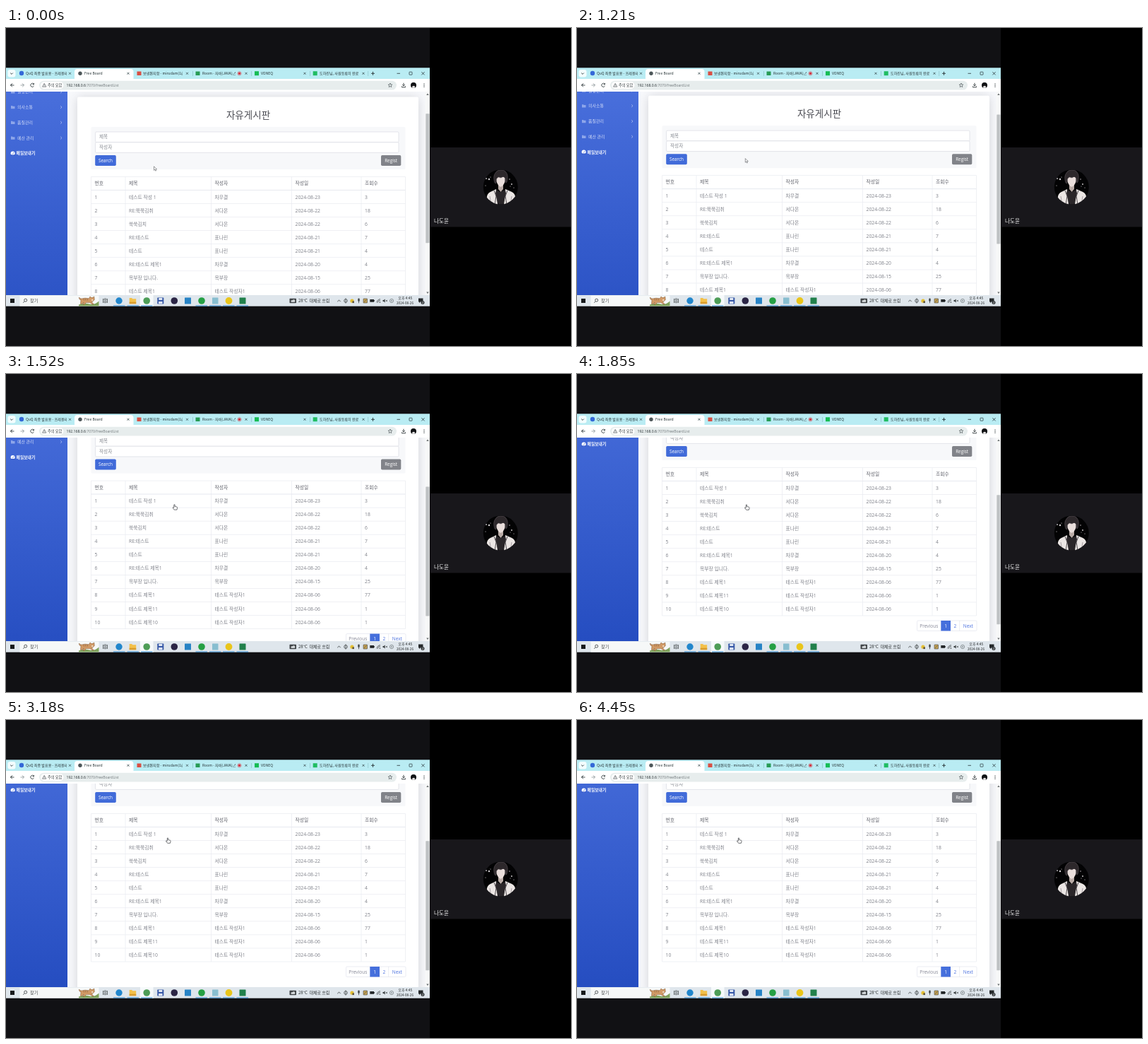
An HTML page with a canvas that plays this animation: 800 by 450 pixels, repeating every 4510 ms.

```html
<!DOCTYPE html>
<html lang="ko">
<head>
<meta charset="utf-8">
<title>자유게시판</title>
<style>
html, body { margin: 0; width: 100%; height: 100%; overflow: hidden; background: #000; }
canvas { display: block; width: 800px; height: 450px; }
</style>
</head>
<body>
<canvas id="stage" width="800" height="450"></canvas>
<script>
const ctx = document.getElementById('stage').getContext('2d');
const LOOP = 4510;
const SANS = '"Open Sans", "Noto Sans CJK KR", "Noto Sans CJK", sans-serif';
const UI = '"Noto Sans CJK KR", "Noto Sans CJK", "Noto Sans", sans-serif';

// [time, value...] keys, eased between neighbours
const SCROLL = [[0, 0], [1190, 0], [1330, 30], [1400, 30], [1540, 61], [1580, 61], [1700, 78]];
const POINTER = [[0, 209.5, 195.8], [90, 209.5, 195.8], [600, 236.5, 176.6], [900, 236.5, 176.6],
  [1200, 238.3, 184.6], [1450, 238.3, 184.6], [1750, 240, 184.8], [2620, 240, 184.8], [3020, 229, 166.8]];

const COLS = [120.5, 169, 290.5, 404.5, 503, 565.5];
const ROWS = [
  ['테스트 작성 1', '차무결', '23', 3],
  ['RE:쭉쭉김취', '서다온', '22', 18],
  ['쑥쑥김치', '서다온', '22', 6],
  ['RE:테스트', '표나린', '21', 7],
  ['테스트', '표나린', '21', 4],
  ['RE:테스트 제목1', '차무결', '20', 4],
  ['옥부장 입니다.', '옥부장', '15', 25],
  ['테스트 제목1', '테스트 작성자1', '06', 77],
  ['테스트 제목11', '테스트 작성자1', '06', 1],
  ['테스트 제목10', '테스트 작성자1', '06', 1]
];
const HEAD_TOP = 210.5, BODY_TOP = 229.5, ROW_H = 19.05;

function track(keys, t) {
  const i = keys.findIndex(k => k[0] > t);
  if (i < 0) return keys[keys.length - 1].slice(1);
  const a = keys[i - 1], b = keys[i];
  const u = (t - a[0]) / (b[0] - a[0]), e = u * u * (3 - 2 * u);
  return a.slice(1).map((v, n) => v + (b[n + 1] - v) * e);
}

function rect(x, y, w, h, fill) {
  ctx.fillStyle = fill;
  ctx.fillRect(x, y, w, h);
}

function box(x, y, w, h, r, fill, stroke, lw = 0.6) {
  ctx.beginPath();
  ctx.roundRect(x, y, w, h, r);
  if (fill) { ctx.fillStyle = fill; ctx.fill(); }
  if (stroke) { ctx.strokeStyle = stroke; ctx.lineWidth = lw; ctx.stroke(); }
}

function dot(x, y, r, fill) {
  ctx.beginPath();
  ctx.arc(x, y, r, 0, Math.PI * 2);
  ctx.fillStyle = fill;
  ctx.fill();
}

function ring(x, y, r, stroke, lw = 0.8) {
  ctx.beginPath();
  ctx.arc(x, y, r, 0, Math.PI * 2);
  ctx.strokeStyle = stroke;
  ctx.lineWidth = lw;
  ctx.stroke();
}

function line(stroke, lw, ...p) {
  ctx.beginPath();
  for (let i = 0; i < p.length; i += 2) ctx.lineTo(p[i], p[i + 1]);
  ctx.strokeStyle = stroke;
  ctx.lineWidth = lw;
  ctx.stroke();
}

function shape(d, fill, stroke, lw = 0.7) {
  const path = new Path2D(d);
  if (fill) { ctx.fillStyle = fill; ctx.fill(path); }
  if (stroke) { ctx.strokeStyle = stroke; ctx.lineWidth = lw; ctx.stroke(path); }
}

function text(s, x, y, size, color, { font = SANS, weight = 400, align = 'left' } = {}) {
  ctx.font = `${weight} ${size}px ${font}`;
  ctx.fillStyle = color;
  ctx.textAlign = align;
  ctx.textBaseline = 'alphabetic';
  ctx.fillText(s, x, y + size * 0.36);
  return ctx.measureText(s).width;
}

function clipped(x, y, w, h, draw) {
  ctx.save();
  ctx.beginPath();
  ctx.rect(x, y, w, h);
  ctx.clip();
  draw();
  ctx.restore();
}

function cross(x, y, r, color = '#35484c', lw = 0.8) {
  line(color, lw, x - r, y - r, x + r, y + r);
  line(color, lw, x + r, y - r, x - r, y + r);
}

function tab(label, x, width, closeX, icon) {
  icon();
  clipped(x, 58, width, 14, () => text(label, x, 64.5, 5.1, '#263235', { font: UI }));
  cross(closeX, 64.3, 1.5);
}

function browserChrome() {
  rect(0, 56.3, 600, 16, '#b9ecf3');
  box(2.5, 59, 11, 10.5, 3, '#f3fdfe');
  line('#263235', 0.9, 6.2, 63.6, 8, 65.4, 9.8, 63.6);
  box(97, 58, 83.5, 17, 4, '#ffffff');
  tab('QuQ 최종 발표용 - 프레젠테이션', 28, 58, 90.5, () => dot(22, 64, 3.2, '#3468d8'));
  tab('Free Board', 111, 50, 173, () => dot(105, 64.3, 2.7, '#4d5659'));
  tab('보낸편지함 - mirudam(1@', 194, 56, 256.5, () => box(185.5, 61.5, 6, 5.5, 0, '#d94f43'));
  tab('Room - 자바(JAVA),스프링', 278, 47, 340, () => box(268.5, 61.5, 6, 5.5, 0, '#279b55'));
  ring(330.5, 64.3, 2.6, '#d44b55', 0.6);
  dot(330.5, 64.3, 1.7, '#d62e3c');
  tab('VONEQ', 361, 50, 423, () => box(352, 61.2, 6, 6, 0, '#16bd55'));
  tab('도하린님, 사원등록이 완료', 444, 56, 506, () => box(434.7, 61.2, 6, 6, 0, '#20bd63'));
  for (const x of [264, 347, 430, 512.5]) rect(x, 61, 0.6, 7, '#83bac0');
  line('#263235', 0.9, 517, 64.3, 522, 64.3);
  line('#263235', 0.9, 519.5, 61.8, 519.5, 66.8);
  line('#263235', 0.8, 553.5, 64.3, 558, 64.3);
  box(571, 62.2, 4, 4, 0.4, null, '#263235', 0.7);
  cross(590.5, 64.3, 2.1, '#263235');

  rect(0, 72, 600, 18, '#ffffff');
  line('#394346', 0.9, 11.5, 81, 6.5, 81, 8.8, 78.7, 6.5, 81, 8.8, 83.3);
  line('#9aa3a5', 0.9, 20.5, 81, 25.5, 81, 23.2, 78.7, 25.5, 81, 23.2, 83.3);
  shape('M39.3 79.4A2.5 2.5 0 1 0 39.5 82M39.5 78v1.9h-2', null, '#394346', 0.9);
  box(47, 74.7, 506, 12.8, 6.4, '#e7eded');
  box(49, 76.2, 32.5, 9.8, 4.9, '#ffffff');
  shape('M54.2 78.3l2.7 4.9h-5.4zM54.2 80v1.6M54.2 82v.6', null, '#3c4548', 0.6);
  text('주의 요함', 59, 81, 5.2, '#31393b', { font: UI });
  const w = text('192.168.0.6', 85.5, 81, 5.1, '#222b2e');
  text(':7070/freeBoardList', 85.5 + w, 81, 5.1, '#71797c');
  shape('M544 78l.8 2 2.1.1-1.6 1.4.5 2.1-1.8-1.1-1.8 1.1.5-2.1-1.6-1.4 2.1-.1z', null, '#3c4548', 0.6);
  shape('M563 77.8v4M561.2 80.1l1.8 1.8 1.8-1.8M560.5 82.4v1.4h5v-1.4', null, '#2c3437', 0.9);
  dot(577, 81, 4, '#111315');
  shape('M574.6 84.2q.4-2.2 2.400-2.400t2.400 2.400q-2.400 1.400-4.800 0z', '#e4e2e2');
  for (const y of [78.8, 81, 83.2]) dot(592, y, 0.65, '#30383a');
}

function sidebar(s) {
  const g = ctx.createLinearGradient(0, 54 - s, 0, 490 - s);
  g.addColorStop(0.1, '#486edb');
  g.addColorStop(1, '#224abe');
  rect(0, 90, 87, 288, g);
  ['일정관리', '의사소통', '품질관리', '예산 관리'].forEach((label, i) => {
    const y = 90.3 + i * 21.75 - s;
    shape(`M7 ${y - 2}h2l.7.8h2.8v3.5h-5.5z`, '#8ea6ea');
    text(label, 16, y, 6, '#cfd9f7');
    line('#b7c5f2', 0.8, 77.2, y - 1.8, 79, y, 77.2, y + 1.8);
  });
  const y = 177.4 - s;
  dot(9.6, y, 3, '#ffffff');
  line('#3a60d0', 0.8, 9.4, y + 0.8, 11, y - 1.4);
  rect(6.5, y + 1.9, 6.2, 1.4, '#3459cb');
  text('메일보내기', 14.6, y, 5.8, '#ffffff', { weight: 700 });
}

function button(x, y, w, label, fill) {
  box(x, y, w, 15, 1.8, fill);
  text(label, x + w / 2, y + 7.4, 6.4, '#ffffff', { align: 'center' });
}

function field(y, label) {
  box(126.5, y, 429.5, 14.7, 1.5, '#ffffff', '#d3d6de');
  text(label, 132, y + 7, 6.6, '#858990');
}

function board(s) {
  rect(87, 90, 513, 288, '#f8f9fc');
  ctx.save();
  ctx.translate(0, -s);
  ctx.shadowColor = 'rgba(58,59,69,0.2)';
  ctx.shadowBlur = 15;
  ctx.shadowOffsetY = 1;
  box(101, 97.5, 483, 370, 2, '#ffffff');
  ctx.shadowColor = 'transparent';

  text('자유게시판', 343, 122.8, 13.5, '#4c4d54', { align: 'center' });
  box(120.5, 140, 445, 60, 1.5, '#f7f8fa');
  field(147, '제목');
  field(161.7, '작성자');
  button(126.2, 180, 29.6, 'Search', '#416bd9');
  button(531, 180, 28.3, 'Regist', '#818389');

  const bottom = BODY_TOP + ROWS.length * ROW_H;
  const grid = '#e8eaf0';
  for (const x of COLS) rect(x - 0.35, HEAD_TOP, 0.7, bottom - HEAD_TOP, grid);
  rect(120.5, HEAD_TOP - 0.35, 445, 0.7, grid);
  rect(120.5, BODY_TOP - 0.6, 445, 1.1, grid);
  ['번호', '제목', '작성자', '작성일', '조회수'].forEach((label, i) =>
    text(label, COLS[i] + 5, 219.6, 6.8, '#5f616a', { weight: 500 }));
  ROWS.forEach(([title, writer, day, views], r) => {
    const y = BODY_TOP + r * ROW_H;
    [r + 1, title, writer, '2024-08-' + day, views].forEach((value, i) =>
      text(String(value), COLS[i] + 5, y + 9.6, 6.8, '#7f818a'));
    rect(120.5, y + ROW_H - 0.35, 445, 0.7, grid);
  });

  box(481.5, 427, 84.5, 14.5, 1.6, '#ffffff', '#dddfeb');
  rect(515.3, 427, 13.7, 14.5, '#456fdc');
  rect(541.5, 427, 0.6, 14.5, '#dddfeb');
  const page = { align: 'center' };
  text('Previous', 498.3, 434.2, 6.5, '#858796', page);
  text('1', 522.1, 434.2, 6.5, '#ffffff', page);
  text('2', 535.4, 434.2, 6.5, '#4e73df', page);
  text('Next', 553.8, 434.2, 6.5, '#4e73df', page);
  ctx.restore();
}

function scrollbar(s) {
  rect(593.5, 90, 6.5, 288, '#f7f8f8');
  shape('M597 92.5l1.8 2.4h-3.6z', '#6c7072');
  shape('M597 376l1.8-2.4h-3.6z', '#6c7072');
  box(594.3, 121.3 + s * 50 / 78, 5.2, 183, 0.5, '#bfc2c4');
}

function cat() {
  shape('M103 393.5v-2q8-3 15-1t13.500-4v7z', '#7fa35c');
  shape('M106 385q-3-1-2.500-4 1 2.500 4 2 4-1.500 10-.2l1.500-2.800 1.800 1.500 2.200-.2 1.800-1.300.5 4.500-2.500 2.500-1.500.5 3 3.500h-1.800l-4-2.500h-5l-2.500 3h-2l1-3.500-2.500 2.500h-2z',
    '#d19a66', '#7d5433', 0.5);
  for (const x of [110, 112.5, 115]) line('#7d5433', 0.6, x, 383, x + 0.4, 385.5);
  dot(122.2, 385, 1.1, '#f4e9da');
}

function taskbar() {
  rect(0, 378, 600, 15.7, '#dfe6ec');
  box(6, 383, 6, 6, 0, '#16191b');
  rect(19.5, 378.7, 112, 14.8, '#f6f8f8');
  ring(27.7, 385.2, 2, '#34393b');
  line('#34393b', 0.8, 26.2, 386.8, 24.3, 388.8);
  text('찾기', 34, 386, 6.2, '#46494b', { font: UI });
  cat();
  for (const x of [137.7, 143.3]) rect(x - 0.4, 383, 0.8, 6, '#34393b');
  box(139.2, 383, 2.6, 2, 0, null, '#34393b');
  box(139.2, 386.7, 2.6, 2, 0, null, '#34393b');

  rect(190, 378, 18.5, 16, '#f6f9fb');
  dot(160, 386, 4.7, '#2186cc');
  shape('M174.7 382h3.5l1 1.2h5v7h-9.5z', '#f3c04a');
  rect(174.7, 387.7, 9.5, 2.5, '#d99c2b');
  dot(199.2, 386, 4.8, '#4d9d57');
  box(214.3, 381.5, 9, 9, 0.8, '#3557a6');
  rect(216.3, 382, 5, 3, '#dfe6f3');
  rect(216, 387, 5.5, 3.3, '#dfe6f3');
  dot(238.3, 386, 4.8, '#2b2545');
  box(253, 381.5, 9, 9, 0.5, '#2783c5');
  dot(277, 386, 4.8, '#25a044');
  box(292, 381.5, 8.5, 9, 0.5, '#88bed0');
  dot(315.5, 386, 4.9, '#e9c51b');
  box(330.5, 381.5, 9, 9, 0.5, '#21804b');
  for (const x of [152, 171.5, 191, 268.5, 288, 307, 326.5]) rect(x, 392.5, 16.5, 1.2, '#3c8dcb');

  box(401.5, 382.7, 9.5, 6.5, 0.8, '#414548');
  dot(405, 386.5, 1.5, '#d3d8da');
  dot(407.4, 386.2, 1.9, '#d3d8da');
  text('28°C  대체로 흐림', 414, 386, 6, '#2c3032', { font: UI });

  const ink = '#3d4244';
  line(ink, 0.9, 469.3, 387.2, 471.5, 385, 473.7, 387.2);
  ring(481, 386, 2.3, ink);
  line(ink, 0.7, 481, 382.3, 481, 389.7);
  dot(490, 386.2, 2.6, '#e3bf36');
  rect(490.5, 386.5, 2.3, 2.6, '#4b4337');
  box(498.3, 382.5, 2.4, 4.5, 1.2, ink);
  line(ink, 0.8, 499.5, 387, 499.5, 389.3);
  box(506, 383, 5.5, 6, 0.5, '#c6a252', ink);
  line(ink, 0.7, 507.2, 387.5, 510.3, 384.5);
  rect(515.3, 384, 5.7, 3.8, '#222628');
  rect(521, 385, 0.8, 1.8, '#222628');
  shape('M525 388.7a5 5 0 0 1 5-5M526.5 388.7a3.5 3.5 0 0 1 3.5-3.5', null, ink, 0.7);
  dot(529.4, 388.1, 0.8, ink);
  shape('M533.5 385h1.3l1.8-1.6v5.2l-1.8-1.6h-1.3z', ink);
  cross(538.8, 386, 1.1, ink, 0.7);
  ring(546, 386, 2.6, '#697174', 0.7);
  cross(546, 386, 0.9, '#697174', 0.6);
  const clock = { font: UI, align: 'center' };
  text('오후 4:45', 565.3, 382.2, 5, '#272b2d', clock);
  text('2024-08-26', 565, 389.6, 4.7, '#272b2d', clock);
  shape('M584 382.5h6.5v5h-4l-1.5 1.7v-1.7h-1z', '#25292b');
  dot(590, 388.5, 2.5, '#34393c');
  text('2', 590, 388.5, 4, '#ffffff', clock);
}

function participant() {
  rect(600, 0, 200, 450, '#000000');
  rect(600.5, 169, 199.5, 112.5, '#18171b');
  ctx.save();
  ctx.beginPath();
  ctx.arc(700.3, 225, 24.5, 0, Math.PI * 2);
  ctx.clip();
  rect(675, 200, 51, 51, '#030304');
  // coat, shirt, neck, face, hair
  shape('M680 250l1-12q1-5 7-7l6-3 2 22zM707 228l7 3q6 2 7 7l1 12h-17z', '#ebe6e4');
  shape('M694 229l6 3 7-3 1 5-4 17h-7l-4-17z', '#2a2629');
  shape('M697 221h7v7l-3.5 4-3.5-4z', '#b9aba6');
  shape('M694.5 211h12v6q-1 5-6 8-5-3-6-8z', '#e9dedb');
  shape('M692 219q-3-9 1-14 2-4 7-4 5-1 8 3 4 5 1 14l-1.500 1-.5-6-3-3-3 2-4-1-3 3-.5 6z', '#2d282b', '#645d62', 0.5);
  line('#3c363b', 0.9, 691, 230, 694, 238, 692, 250);
  line('#3c363b', 0.9, 710, 230, 707, 238, 709, 250);
  line('#8b8288', 0.7, 685, 238, 687, 250);
  line('#8b8288', 0.7, 716, 238, 714, 250);
  for (const [x, y, r] of [[680, 213, 0.9], [684, 214, 1.2], [686, 211, 0.6], [679, 223, 0.6],
    [713, 214, 0.7], [716, 221, 0.9], [719, 226, 0.6], [714, 224, 0.5]]) dot(x, y, r, '#d7d3d6');
  ctx.restore();
  text('나도윤', 606, 273.5, 7.6, '#f1f1f2', { font: UI });
}

function pointer(x, y, s) {
  const overRow = y > BODY_TOP - s && x > COLS[0] && x < COLS[5];
  ctx.save();
  ctx.translate(x, y);
  if (overRow) {
    shape('M-.7.4q.7-.8 1.3 0v2.4l2.9.7q.8.3.6 1.2l-.7 2.8h-3.7l-2.3-3q.2-1 1.9 0z', '#ffffff', '#33363a', 0.7);
  } else {
    shape('M0 0v5.6l1.3-1.2.9 2 1-.4-.9-2h1.7z', '#ffffff', '#55585c', 0.6);
  }
  ctx.restore();
}

function frame(now) {
  const t = now % LOOP;
  const [s] = track(SCROLL, t);
  const [px, py] = track(POINTER, t);
  rect(0, 0, 800, 450, '#111114');
  clipped(0, 90, 600, 288, () => {
    board(s);
    sidebar(s);
    scrollbar(s);
  });
  browserChrome();
  taskbar();
  participant();
  pointer(px, py, s);
  requestAnimationFrame(frame);
}
requestAnimationFrame(frame);
</script>
</body>
</html>
```
